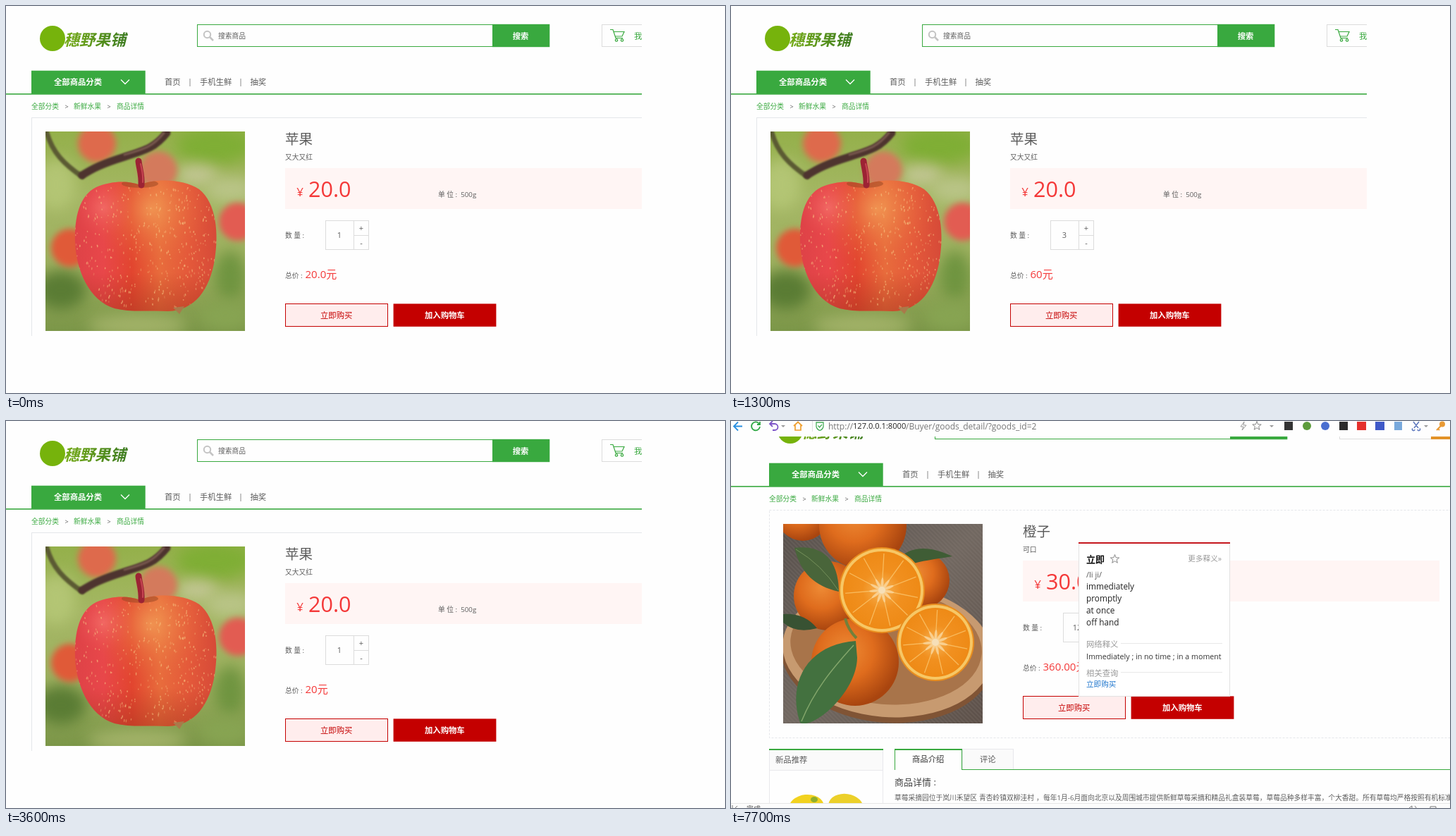
Write an HTML page with a canvas that moves like this. It is 1020 px wide and 549 px high and loops after 8 s.

```html
<!DOCTYPE html>
<html lang="zh-CN">
<head>
<meta charset="utf-8">
<title>商品详情</title>
<style>
html, body { margin: 0; width: 100%; height: 100%; overflow: hidden; background: #fefefe; }
canvas { display: block; }
</style>
</head>
<body>
<canvas id="stage" width="1020" height="549"></canvas>
<script>
const LOOP = 8000, SHOP_END = 5400, POPUP_AT = 7700;
const GREEN = '#39a93f', RED = '#c40000', PRICE = '#f43838', GRAY = '#5c5c5c', EDGE = '#dcdcdc';
const FONT = '"Open Sans", "Noto Sans CJK SC", "Noto Sans CJK", sans-serif';
const SMALL = 9.75, MID = 11.35;
const STEPS = [[0, 1], [500, 2], [1300, 3], [1800, 4], [3100, 3], [3400, 2], [3600, 1]];

let g = document.getElementById('stage').getContext('2d');
const screen = g;

// y is the visual middle of the line
function text(s, x, y, size, color = GRAY, align = 'left', style = '') {
  g.font = `${style} ${size}px ${FONT}`;
  g.fillStyle = color;
  g.textAlign = align;
  g.fillText(s, x, y + size * 0.38);
}

function rect(x, y, w, h, color) {
  g.fillStyle = color;
  g.fillRect(x, y, w, h);
}

function box(x, y, w, h, edge, fill) {
  if (fill) rect(x, y, w, h, fill);
  g.strokeStyle = edge;
  g.lineWidth = 1;
  g.strokeRect(x + 0.5, y + 0.5, w - 1, h - 1);
}

function disc(x, y, r, color) {
  g.fillStyle = color;
  g.beginPath();
  g.arc(x, y, r, 0, Math.PI * 2);
  g.fill();
}

function oval(x, y, rx, ry, color, turn = 0) {
  g.fillStyle = color;
  g.beginPath();
  g.ellipse(x, y, rx, ry, turn, 0, Math.PI * 2);
  g.fill();
}

function stroke(path, color, width = 1) {
  g.strokeStyle = color;
  g.lineWidth = width;
  g.stroke(new Path2D(path));
}

function fill(path, color) {
  g.fillStyle = color;
  g.fill(new Path2D(path));
}

function blend(x0, y0, x1, y1, ...colors) {
  const grad = g.createLinearGradient(x0, y0, x1, y1);
  colors.forEach((c, i) => grad.addColorStop(i / (colors.length - 1), c));
  return grad;
}

function glow(x, y, r, ...colors) {
  const grad = g.createRadialGradient(x, y, 0, x, y, r);
  colors.forEach((c, i) => grad.addColorStop(i / (colors.length - 1), c));
  return grad;
}

function random(seed) {
  return () => (seed = (seed * 16807) % 2147483647) / 2147483647;
}

function star(x, y, r, color) {
  g.beginPath();
  for (let i = 0; i < 10; i++) {
    const a = i * Math.PI / 5 - Math.PI / 2, d = i % 2 ? r * 0.42 : r;
    g.lineTo(x + Math.cos(a) * d, y + Math.sin(a) * d);
  }
  g.closePath();
  g.strokeStyle = color;
  g.lineWidth = 1;
  g.stroke();
}

function photo(paint) {
  const c = document.createElement('canvas');
  c.width = c.height = 283;
  g = c.getContext('2d');
  g.lineCap = g.lineJoin = 'round';
  paint();
  g = screen;
  return c;
}

function paintApple() {
  rect(0, 0, 283, 283, blend(0, 0, 0, 283, '#94b04a', '#a5b765', '#9db05f', '#7b9648'));
  g.filter = 'blur(10px)';
  oval(240, 20, 55, 26, '#7fae35');
  oval(15, 75, 28, 36, '#b3c574');
  oval(215, 62, 30, 14, '#c3c795');
  oval(262, 82, 36, 18, '#b9c487');
  oval(22, 225, 36, 28, '#5a7c34');
  oval(262, 205, 22, 36, '#6f9440');
  oval(255, 262, 36, 20, '#87a452');
  oval(130, 275, 70, 16, '#a2b268');
  g.filter = 'blur(4px)';
  disc(73, 17, 27, '#de6a4c');
  disc(160, 55, 27, '#d47a5c');
  disc(35, 165, 27, '#e05a38');
  disc(273, 128, 27, '#e25c52');
  g.filter = 'blur(1px)';
  stroke('M2 2C10 30 26 46 52 64', '#5b5a33', 7);
  stroke('M172 2C156 22 144 26 112 36S68 52 52 62', '#4e342f', 11);
  stroke('M168 2C152 22 140 25 112 33', '#7a5a50', 3);
  g.filter = 'none';

  const body = new Path2D('M134 76C118 69 92 70 72 79C48 91 41 122 42 156C43 196 62 240 98 251C122 257 150 253 174 255C212 254 233 224 240 182C246 146 243 102 218 82C196 67 154 66 134 76Z');
  g.save();
  g.clip(body);
  rect(0, 0, 283, 283, blend(42, 0, 243, 0, '#de4247', '#e8474a', '#e2452f', '#e86c3c', '#e4593a', '#d64a38'));
  rect(0, 0, 283, 283, glow(150, 110, 85, 'rgba(247,180,98,.6)', 'rgba(240,140,74,.3)', 'rgba(230,100,60,0)'));
  rect(0, 0, 283, 283, glow(82, 108, 42, 'rgba(250,130,125,.5)', 'rgba(240,90,90,0)'));
  rect(0, 200, 283, 60, blend(0, 200, 0, 256, 'rgba(170,45,25,0)', 'rgba(165,55,30,.5)'));
  const rnd = random(71);
  for (let i = 0; i < 420; i++) {
    const u = rnd() * 2 - 1, y = 80 + rnd() * 170;
    const x = 142 + u * 100;
    g.globalAlpha = 0.2 + rnd() * 0.45;
    oval(x, y, 0.8, 0.9 + rnd() * 1.4, '#f8c884', -u * (y - 160) / 250);
  }
  g.globalAlpha = 1;
  oval(134, 74, 26, 6, 'rgba(150,70,35,.5)');
  g.restore();
  stroke('M136 76C137 62 133 52 132 42', '#9c2334', 9);
  stroke('M138 72C139 60 136 52 135 46', '#c64552', 2);
  fill('M181 250L197 248L190 259Z', '#a97a4a');
}

function cutOrange(x, y, r) {
  disc(x, y, r, '#e98d1e');
  disc(x, y, r - 2, '#f7c765');
  disc(x, y, r - 6, glow(x, y, r - 6, '#f7b455', '#f1901f', '#ee8a16'));
  for (let i = 0; i < 11; i++) {
    const a = i * Math.PI * 2 / 11 + 0.2;
    stroke(`M${x} ${y}L${x + Math.cos(a) * (r - 9)} ${y + Math.sin(a) * (r - 9)}`, 'rgba(252,205,120,.7)', 1.3);
    oval(x + Math.cos(a) * 9, y + Math.sin(a) * 9, 9, 2, 'rgba(250,215,160,.75)', a);
  }
  disc(x, y, 5, '#f6dfb8');
}

function orange(x, y, r) {
  disc(x, y, r, glow(x - r * 0.2, y - r * 0.25, r * 1.25, '#ee8b35', '#df6c1d', '#a9450f'));
}

function paintOranges() {
  rect(0, 0, 283, 283, blend(0, 0, 283, 283, '#57504c', '#716861', '#5c5049'));
  g.lineCap = 'butt';
  for (let i = -283; i < 283; i += 6) stroke(`M${i} 0L${i + 283} 283`, 'rgba(150,140,132,.16)', 2);
  oval(148, 186, 151, 96, '#805435', 0.08);
  oval(148, 180, 149, 94, '#c79a70', 0.08);
  oval(146, 174, 136, 82, '#a8744a', 0.08);
  orange(28, -14, 38);
  orange(113, 2, 62);
  orange(64, 102, 49);
  orange(196, 80, 40);
  fill('M16 34C50 30 78 44 79 96C44 88 25 70 16 34Z', '#49653a');
  stroke('M18 36Q55 58 78 94', '#75905a');
  fill('M166 48C184 28 216 34 240 46C216 50 196 52 176 59Z', '#3f5d35');
  fill('M0 128Q30 126 48 148Q18 156 0 140Z', '#385233');
  orange(102, 196, 62);
  cutOrange(140, 94, 61);
  cutOrange(216, 168, 55);
  fill('M103 166C38 170 4 222 24 282C42 292 104 240 105 190Z', '#43713f');
  stroke('M100 172C70 205 44 236 26 280', '#83a66b', 1.5);
  stroke('M88 134Q92 150 104 162', '#71803b', 4);
}

const apple = photo(paintApple), oranges = photo(paintOranges);

function header() {
  disc(66, 46, 18, '#76b30c');
  text('穗野果铺', 82, 48, 22, blend(82, 0, 170, 0, '#76ac17', '#3f7d21'), 'left', 'italic bold');

  box(271, 26, 420, 32, GREEN);
  rect(690, 25.8, 81.3, 32.4, GREEN);
  text('搜索', 730, 43, MID, '#fff', 'center', 'bold');
  g.strokeStyle = '#c4c4c4';
  g.lineWidth = 2;
  g.beginPath();
  g.arc(285.5, 40.5, 4.7, 0, Math.PI * 2);
  g.stroke();
  stroke('M289 44L294 49', '#c4c4c4', 2.5);
  text('搜索商品', 301, 42.5, SMALL);

  box(845, 26, 131, 32, EDGE);
  rect(975, 26, 60, 32, '#e39328');
  stroke('M857 33.5H861L865 45.5H875M862 36.5H877L874 43H864', GREEN, 1.2);
  for (const x of [866, 874]) {
    g.beginPath();
    g.arc(x, 48.5, 1.7, 0, Math.PI * 2);
    g.stroke();
  }
  text('我的购物车', 891, 42.5, MID, GREEN);
}

function nav() {
  rect(36, 91.7, 161.7, 33, GREEN);
  text('全部商品分类', 68, 107.5, MID, '#fff', 'left', 'bold');
  stroke('M163 104.5L169 110.5L175 104.5', '#fff', 1.3);
  rect(-20, 124.1, 1040, 1.6, GREEN);
  [['首页', 225], ['手机生鲜', 275], ['抽奖', 346.5]].forEach(([s, x]) => text(s, x, 107.5, MID));
  for (const x of [261, 333]) text('|', x, 107.5, 10, GRAY, 'center');
  [['全部分类', 36], ['新鲜水果', 96], ['商品详情', 157]].forEach(([s, x]) => text(s, x, 142.5, SMALL, GREEN));
  for (const x of [86, 146]) text('>', x, 142.5, 9, GRAY, 'center');
}

function product(p) {
  g.drawImage(p.photo, 56, 178);
  text(p.name, 396, 188.5, 19.5);
  text(p.note, 396, 214.5, SMALL);
  rect(396, 230, p.right - 396, 58, '#fff5f4');
  text('¥', 417, 264, 17, PRICE, 'center');
  text(p.price, 429, 259.5, 30.5, PRICE);
  text('单 位 :  500g', 613, 267, SMALL);

  text('数 量 :', 396, 325, SMALL);
  box(453, 304, 62, 42, EDGE);
  rect(493, 304, 1, 42, EDGE);
  rect(493, 325, 22, 1, EDGE);
  text(p.count, 473, 325, 11, GRAY, 'center');
  text('+', 504, 315, 11, GRAY, 'center');
  text('-', 504, 335.5, 11, GRAY, 'center');
  text('总价 :', 396, 382, SMALL);
  text(p.total, 424.5, 380.5, 15, PRICE);

  box(396, 422, 146, 33, RED, '#ffeded');
  text('立即购买', 446, 439, MID, RED);
  rect(549.6, 422.4, 145.8, 32.4, RED);
  text('加入购物车', 594, 439, MID, '#fff', 'left', 'bold');
}

function page(p, dx, dy, x, y, w, h) {
  g.save();
  g.beginPath();
  g.rect(x, y, w, h);
  g.clip();
  g.translate(dx, dy);
  header();
  nav();
  g.setLineDash(p.dash);
  box(36, 158, 1200, p.height, '#e4e6ea');
  g.setLineDash([]);
  product(p);
  g.restore();
}

function appleScene(t) {
  const count = STEPS.filter(s => s[0] <= t).pop()[1];
  const total = t < STEPS[1][0] ? '20.0元' : count * 20 + '元';
  page({ photo: apple, name: '苹果', note: '又大又红', price: '20.0', count, total,
    right: 920, dash: [], height: 400 }, 0, 0, 0, 0, 902, 468);
}

function toolbar() {
  stroke('M16 7.5H4M10 1.5L4 7.5L10 13.5', '#2a8fe0', 1.8);
  stroke('M40 4A6 6 0 1 0 41 8M41 1V5H37', '#30a845', 1.8);
  stroke('M56 4H62A4.5 4.5 0 0 1 62 13H59M59 0L55 4L59 8', '#7d55c8', 1.8);
  stroke('M89 7L95 1.5L101 7M91 6V13H99V6', '#f0a030', 1.7);
  rect(115, 0, 1, 15, '#e0e0e0');
  stroke('M121 2H131V8Q130 12 126 13.5Q122 12 121 8ZM123.5 6.5L125.5 9L129 5', '#45ad57', 1.3);
  text('http://', 138, 7, 12, '#777');
  text('127.0.0.1:8000', 173, 7, 11.1, '#222');
  text('/Buyer/goods_detail/?goods_id=2', 248, 7, 12, '#777');
  stroke('M728 1L723 8H727L725 13L731 6H727Z', '#999');
  star(746, 7, 6.5, '#888');
  for (const x of [74, 767, 986]) fill(`M${x - 3} 6H${x + 3}L${x} 9Z`, '#999');
  rect(785, 1, 12, 12, '#333');
  disc(817, 7, 6, '#5d9c3c');
  disc(843, 7, 6, '#4a6fd0');
  rect(863, 1, 12, 12, '#2b2b2b');
  rect(888, 1, 13, 12, '#e5302c');
  rect(914, 1, 13, 12, '#3f59c8');
  rect(941, 1, 11, 12, '#78a9dc');
  stroke('M968 1L975 10M976 1L969 10M967 10.5A1.8 1.8 0 1 0 970 12M977 10.5A1.8 1.8 0 1 1 974 12', '#5b76bd', 1.5);
  disc(1009, 4.5, 4, '#e99a35');
  stroke('M1007 7L1001 13M1003 11L1005 13', '#e99a35', 2);
}

function lower() {
  box(54, 466, 162, 90, '#e8e8ec');
  rect(55, 467, 160, 28, '#fafafa');
  rect(54, 495, 162, 1, '#e8e8ec');
  rect(54, 465, 162, 2, GREEN);
  text('新品推荐', 63, 481, MID);
  oval(107, 548, 25, 18, '#f2d21f', -0.1);
  oval(163, 547, 25, 18, '#ecd02a', 0.15);
  oval(118, 537, 5, 4, '#8fae2c');

  box(328, 465, 73, 30, '#e8e8ec', '#fafafa');
  text('评论', 353, 480, MID);
  rect(232, 465, 96, 2, GREEN);
  rect(232, 465, 1, 30, GREEN);
  rect(327, 465, 1, 30, GREEN);
  rect(327, 494, 693, 1, GREEN);
  text('商品介绍', 257, 480, MID, '#333');
  text('商品详情 :', 232, 512, 13, '#444');
  text('草莓采摘园位于岚川禾望区', 232, 534, SMALL);
  text('青杏岭镇双柳洼村', 352, 534, SMALL);
  text('，', 433, 534, SMALL);
  text('每年1月-6月面向北京以及周围城市提供新鲜草莓采摘和精品礼盒装草莓，草莓品种多样丰富，个大香甜。所有草莓均严格按照有机标准培育', 443, 534, SMALL);

  rect(0, 543, 1020, 6, '#fcfcfc');
  rect(0, 542, 1020, 1, '#e6e6e6');
  text('完成', 22, 550, 10, '#555');
  stroke('M2 549V545M6 549L9 546', '#777');
  stroke('M962 549L966 546V549M970 546Q972 548 972 549M992 549V547H1000V549', '#777');
}

function popup() {
  box(493, 172, 215, 219, '#e2e2e2', '#fff');
  rect(493, 172, 215, 2, '#c5161d');
  text('立即', 504, 196, 13, '#111', 'left', 'bold');
  star(544.5, 196, 6.5, '#888');
  text('更多释义»', 696, 195, 10.6, '#999', 'right');
  text('/li ji/', 504, 218, 11, '#555');
  ['immediately', 'promptly', 'at once', 'off hand'].forEach((s, i) => text(s, 504, 235 + i * 17, 11.8, '#222'));
  [['网络释义', 316], ['相关查询', 357]].forEach(([s, y]) => {
    text(s, 504, y + 0.5, MID, '#999');
    rect(553, y - 1, 144, 1, '#e8e8e8');
  });
  text('Immediately ; in no time ; in a moment', 504, 334, 10.65, '#333');
  text('立即购买', 504, 372.5, 10.6, '#1c74cc');
}

function orangeScene(t) {
  page({ photo: oranges, name: '橙子', note: '可口', price: '30.0', count: 12, total: '360.00元',
    right: 987, dash: [3, 2], height: 324 }, 18, -32, 0, 22, 1020, 521);
  toolbar();
  lower();
  if (t >= POPUP_AT) popup();
}

const start = performance.now();
function draw() {
  const t = (performance.now() - start) % LOOP;
  rect(0, 0, 1020, 549, '#fefefe');
  (t < SHOP_END ? appleScene : orangeScene)(t);
  requestAnimationFrame(draw);
}
draw();
</script>
</body>
</html>
```
